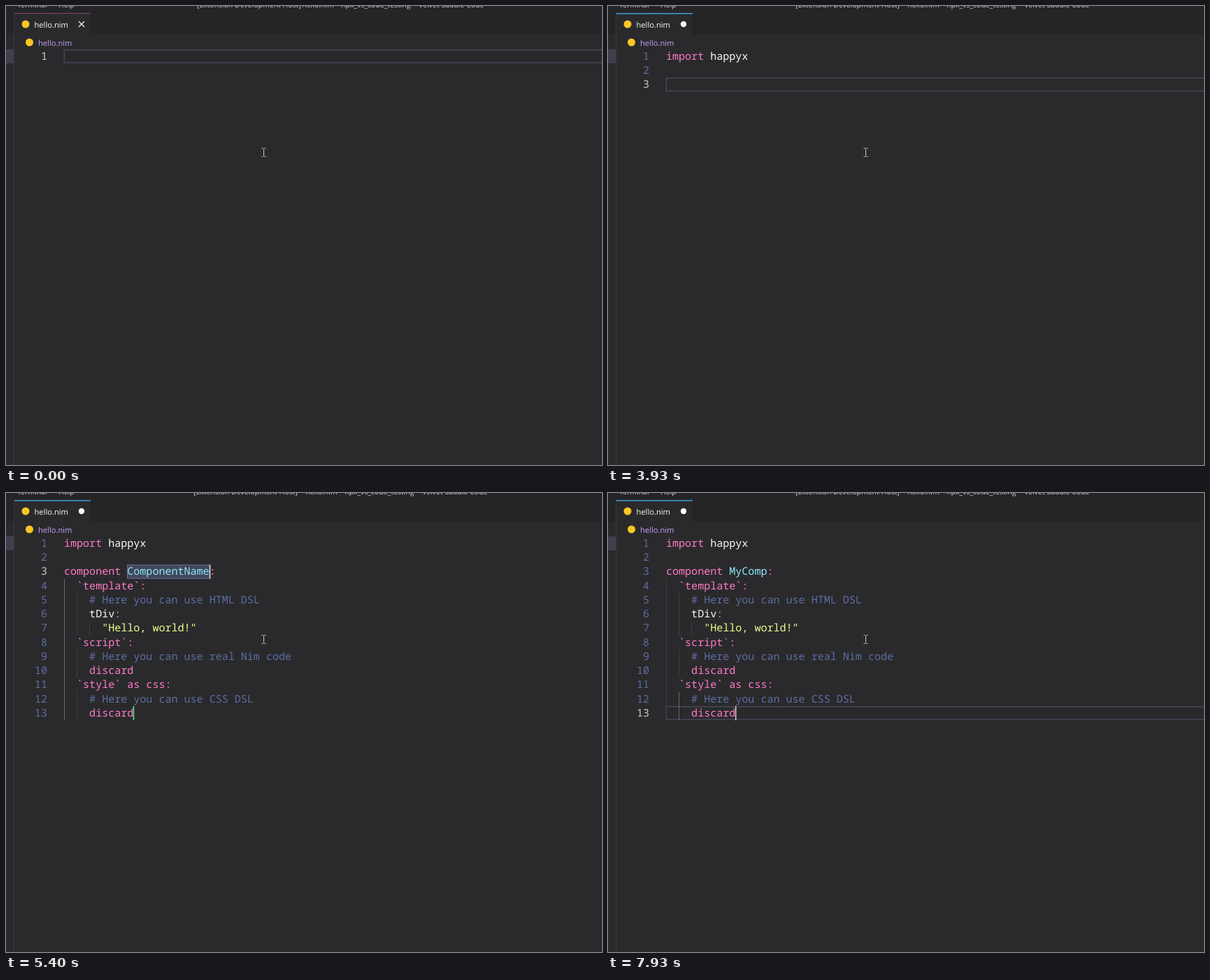
Animation, 852 px wide and 657 px high, one loop 8 s. Source, as an HTML page:

```html
<!DOCTYPE html>
<html lang="en">
<head>
<meta charset="utf-8">
<title>Typing a component snippet</title>
<style>
html, body { margin: 0; width: 100%; height: 100%; overflow: hidden; background: #2a2a2c; }
svg { display: block; width: 852px; height: 657px; }
text { white-space: pre; text-rendering: geometricPrecision; }
.mono { font: 15.05px "Noto Sans Mono", "DejaVu Sans Mono", monospace; }
.detail { font-size: 12.8px; font-weight: 600; fill: #b0b0b4; text-anchor: end; }
.ui { font: 500 11.15px "Open Sans", "Noto Sans", sans-serif; fill: #f8f8f2; }
.bar { font-size: 10.5px; fill: #d2d2ce; }
.w { fill: #f8f8f2; }
.p { fill: #ff79c6; }
.c { fill: #8be9fd; }
.y { fill: #f1fa8c; }
.g { fill: #5e6da3; }
.n { text-anchor: end; fill: #5e6da3; }
.n.on { fill: #cacac8; }
.hit { fill: #8be9fd; font-weight: 700; }
</style>
</head>
<body>
<svg viewBox="0 0 852 657" xmlns="http://www.w3.org/2000/svg">
  <rect width="852" height="657" fill="#2a2a2c"/>
  <rect width="852" height="41" fill="#252527"/>
  <rect x="12" y="10" width="109" height="32" fill="#2a2a2c"/>
  <rect x="11" y="10" width="1" height="647" fill="#38383b"/>
  <rect x="121" y="11" width="1" height="30" fill="#222224"/>
  <rect y="62" width="11" height="20" fill="#3f404d"/>
  <circle cx="28" cy="26" r="5.5" fill="#fcc624"/>
  <circle cx="33.5" cy="52" r="5.5" fill="#fcc624"/>
  <text class="ui" x="40.5" y="30.6">hello.nim</text>
  <text class="ui" x="46" y="56.6" style="fill:#c4a0fa">hello.nim</text>
  <text class="ui bar" x="16" y="2">Terminal</text>
  <text class="ui bar" x="75" y="2">Help</text>
  <g id="head"></g>
  <g id="code"></g>
  <path d="M365.5 203.5h2l1 1l1-1h2M368.5 204.5v10M365.5 215.5h2l1-1l1 1h2" fill="none" stroke="#c8c8c8"/>
</svg>
<script>
const LOOP = 8000, X0 = 83, Y0 = 62, ADV = 9.03, ROW = 20.25;
const colX = col => X0 + col * ADV;
const rowY = line => Y0 + (line - 1) * ROW;
const rect = (x, y, w, h, attrs) => `<rect x="${x}" y="${y}" width="${w}" height="${h}" ${attrs}/>`;
const text = (cls, x, y, body) => `<text class="${cls}" x="${x}" y="${y}">${body}</text>`;
const span = (cls, s) => `<tspan class="${cls}">${s}</tspan>`;

const IMPORT = span('p', 'import');
const BODY = [
  span('p', '  `template`:'),
  span('g', '    # Here you can use HTML DSL'),
  span('w', '    tDiv') + span('p', ':'),
  span('y', '      "Hello, world!"'),
  span('p', '  `script`:'),
  span('g', '    # Here you can use real Nim code'),
  span('p', '    discard'),
  span('p', '  `style` as css:'),
  span('g', '    # Here you can use CSS DSL'),
  span('p', '    discard')
];
// [indent column, first line, last line]
const GUIDES = [[0, 4, 13], [2, 5, 7], [4, 7, 7], [2, 9, 10], [2, 12, 13]];

const COM_MENU = { col: 3, items: [['', 'com', 'ponent', 'Component Declaration']] };
const M_MENU = { col: 11, items: [
  ['', 'm', 'odel', 'Request Model Declaration'],
  ['', 'm', 'ount', 'Mount Declaration'],
  ['request', 'M', 'odel', 'Request Model Declaration']
] };

// Each entry changes some of the state that came before it.
const STEPS = [
  [0, { dirty: false, first: '', third: '', name: '', lines: 1, line: 1, caret: false,
        menu: null, selected: false, tabstops: false }],
  [130, { caret: true }],
  [670, { caret: false }],
  [1130, { dirty: true, caret: true, first: 'i' }],
  [1270, { first: 'im' }],
  [1400, { first: 'imp' }],
  [1530, { first: 'impo' }],
  [1730, { first: 'import' }],
  [1930, { first: 'import ' }],
  [2130, { first: 'import ha' }],
  [2400, { first: 'import hap' }],
  [2670, { first: 'import happ' }],
  [2870, { first: 'import happy' }],
  [3070, { first: 'import happyx' }],
  [3270, { lines: 2, line: 2 }],
  [3470, { lines: 3, line: 3 }],
  [3930, { caret: false }],
  [4470, { caret: true, third: 'c' }],
  [4670, { third: 'co' }],
  [4800, { third: 'com' }],
  [4930, { menu: COM_MENU }],
  [5330, { menu: null, lines: 13, name: 'ComponentName', selected: true, tabstops: true }],
  [5800, { caret: false }],
  [6130, { caret: true, selected: false, name: 'M' }],
  [6200, { menu: M_MENU }],
  [6330, { menu: null, name: 'My' }],
  [6470, { name: 'MyC' }],
  [6670, { name: 'MyCo' }],
  [7130, { caret: false }],
  [7400, { caret: true, name: 'MyCom' }],
  [7670, { name: 'MyComp' }],
  [7930, { line: 13, tabstops: false }]
];
const STATES = [];
STEPS.reduce((prev, [, change]) => {
  const next = { ...prev, ...change };
  STATES.push(next);
  return next;
}, {});

function caretCol(s) {
  if (s.line === 1) return s.first.length;
  if (s.line === 13) return 11;
  if (s.line === 3) return s.name ? 10 + s.name.length : s.third.length;
  return 0;
}

function drawHead(s) {
  const d = s.dirty ? 5 : 0;
  const title = [[273 - d, '[Extension Development Host]'], [423 + d, 'hello.nim'],
    [479 + d, 'hpx_vs_code_testing'], [590 + d, 'Velvet Saddle Code']];
  const bar = title.map(([x, t]) => text('ui bar', x, 2, t)).join('');
  return bar + (s.dirty
    ? rect(12, 10, 109, 1.6, 'fill="#3a98d0"') + '<circle cx="108" cy="26" r="4.2" fill="#fff"/>'
    : rect(12, 10, 109, 1, 'fill="#83496b"') +
      '<path d="M104 22l8 8M112 22l-8 8" stroke="#f0f0ec" stroke-width="1.3"/>');
}

function drawMenu({ col, items }) {
  const x = Math.round(colX(col)) + 0.5, y = 123.5;
  let out = rect(x, y, 395, items.length * ROW + 2.5, 'fill="#222224" stroke="#3d3d42"');
  out += rect(x + 0.5, y + 0.5, 394.5, ROW, 'fill="#44475a"');
  items.forEach(([pre, hit, post, detail], i) => {
    const top = y + 0.5 + i * ROW, left = x + 4.5;
    out += `<path d="M${left} ${top + 15.5}v-11h11v11" fill="none" stroke="#d8d8d8" stroke-width="1.3"/>` +
      `<path d="M${left} ${top + 15.5}h11.5" stroke="#d8d8d8" stroke-width="1.3" stroke-dasharray="2 1.2"/>` +
      text('mono w', x + 20.5, top + 14.6, pre + span('hit', hit) + post) +
      text('mono detail', x + 386, top + 13.8, detail);
  });
  return out;
}

function codeLine(s, line) {
  if (line === 1) {
    return s.first.startsWith('import') ? IMPORT + span('w', s.first.slice(6)) : span('w', s.first);
  }
  if (line === 3) {
    return s.name ? span('p', 'component ') + span('c', s.name) + span('p', ':') : span('w', s.third);
  }
  return line > 3 ? BODY[line - 4] : '';
}

function drawCode(s) {
  let out = '';
  if (!s.selected) {
    out += rect(83.25, rowY(s.line) + 0.8, 780, ROW - 1.9, 'fill="none" stroke="#44475a" stroke-width="1.5"');
  }
  if (s.lines === 13) {
    for (const [col, from, to] of GUIDES) {
      const active = s.line === 3 ? col === 0 : from === 12;
      out += rect(Math.round(colX(col)), rowY(from), 1, (to - from + 1) * ROW,
        `fill="${active ? '#69696d' : '#404044'}"`);
    }
  }
  if (s.tabstops) {
    const fill = s.selected ? '#44475a' : '#2a2a2c';
    out += rect(173.5, rowY(3) + 0.5, Math.round(s.name.length * ADV), ROW - 1, `fill="${fill}" stroke="#6272a4"`);
    out += rect(181.7, rowY(13), 1.5, ROW, 'fill="#50fa7b"');
  }
  for (let line = 1; line <= s.lines; line++) {
    const base = rowY(line) + 14.8;
    out += text('mono n' + (line === s.line ? ' on' : ''), 59, base, line);
    out += text('mono', X0, base, codeLine(s, line));
  }
  if (s.caret) out += rect(Math.round(colX(caretCol(s))), rowY(s.line), 1.3, ROW, 'fill="#e4e4e0"');
  return out + (s.menu ? drawMenu(s.menu) : '');
}

const head = document.getElementById('head');
const code = document.getElementById('code');
const start = performance.now();
let shown = -1;

function tick(now) {
  const t = Math.max(0, now - start) % LOOP;
  const i = STEPS.findLastIndex(([at]) => at <= t);
  if (i !== shown) {
    shown = i;
    head.innerHTML = drawHead(STATES[i]);
    code.innerHTML = drawCode(STATES[i]);
  }
  requestAnimationFrame(tick);
}
tick(start);
</script>
</body>
</html>
```
